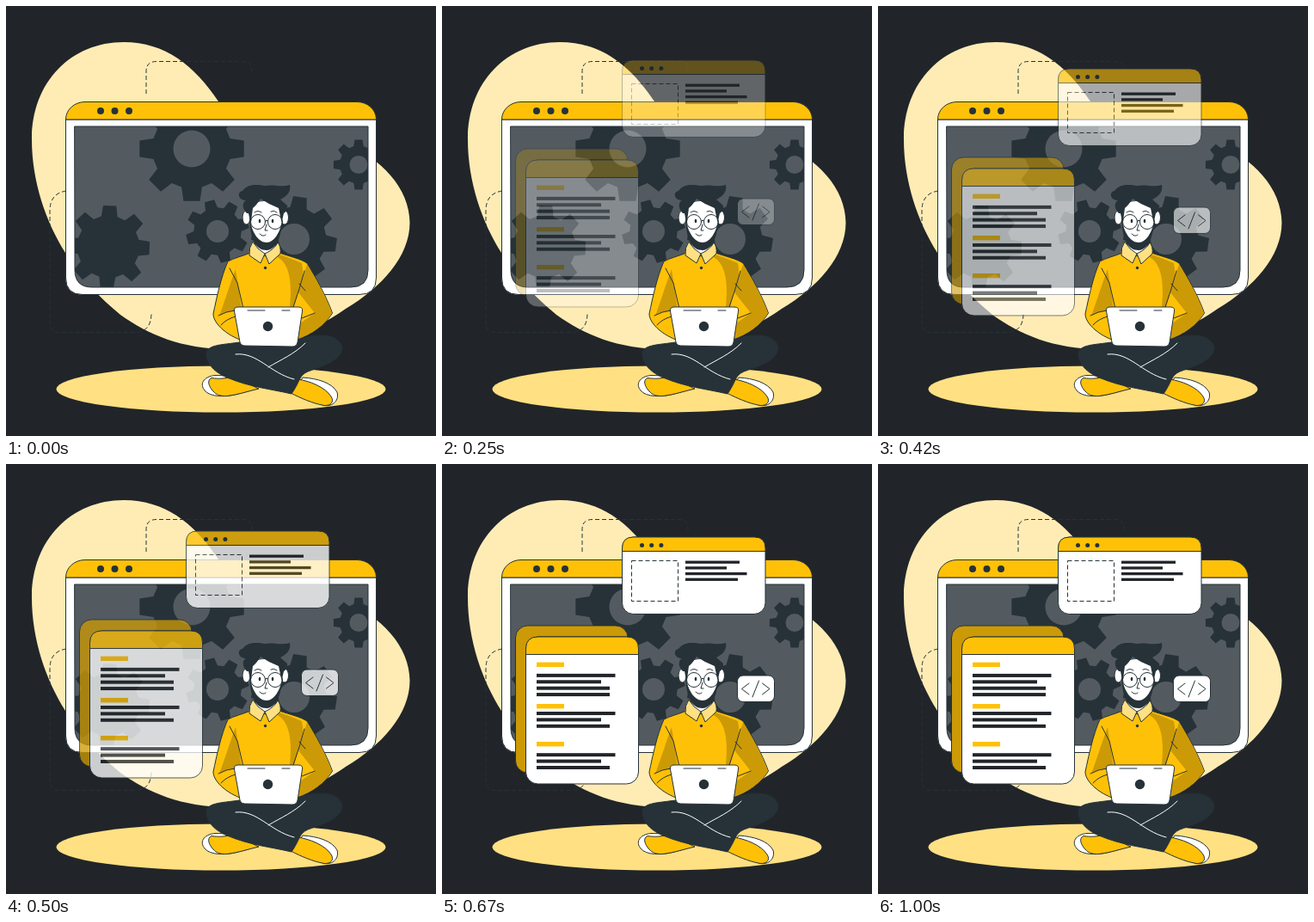
These frames come from a looping animation (500 by 500 pixels, 1040 ms). An HTML page:

```html
<!DOCTYPE html>
<html lang="en">
<head>
<meta charset="utf-8">
<title>Developer at work</title>
<style>
  html, body { margin: 0; width: 100%; height: 100%; overflow: hidden; background: #212529; }
  svg { display: block; width: 100vw; height: 100vh; }
  .gold { fill: #ffc107; }
  .shade { fill: #cc9a06; }
  .soft { fill: #ffe083; }
  .white { fill: #fff; }
  .ink { fill: #263238; }
  .screen { fill: #535b61; }
  .edge { stroke: #263238; stroke-width: 1; stroke-linejoin: round; }
  .line { fill: none; stroke: #263238; stroke-width: 1; stroke-linecap: round; stroke-linejoin: round; }
  .dash { fill: none; stroke: #263238; stroke-width: 1; stroke-dasharray: 5 3; }
</style>
</head>
<body>
<svg viewBox="0 0 500 500">
  <defs>
    <path id="view" d="M80 140H421V307Q421 327 401 327H100Q80 327 80 307Z"/>
    <clipPath id="viewClip"><use href="#view"/></clipPath>
  </defs>

  <rect width="500" height="500" fill="#212529"/>
  <path fill="#ffecb5" d="M137 42C185 42 219 69 247 111C285 163 340 134 390 157C438 178 469 212 469.500 252C469.500 291 437 327 395 352C350 383 304 399 258 399C205 399 165 382 133 359C110 340 85 315 69 287C47 252 30 205 30 155C30 88 76 42 137 42Z"/>
  <path class="dash" d="M163 102V76Q163 64.500 175 64.500H276Q286 64.500 286 74V78"/>
  <path class="dash" d="M70 215Q51 218 51 238V368Q51 379.500 62 379.500H150Q169 379 169 357"/>
  <ellipse class="soft" cx="250" cy="445.500" rx="191.500" ry="27"/>

  <g id="browser">
    <path class="white edge" d="M69.500 132V316Q69.500 335.500 89 335.500H411Q430.500 335.500 430.500 316V132Z"/>
    <path class="gold edge" d="M69.500 132C69.500 120 80 111.500 92 111.500H408C420 111.500 430.500 120 430.500 132Z"/>
    <use href="#view" class="screen"/>
    <g id="gears" clip-path="url(#viewClip)"></g>
    <use href="#view" class="line"/>
  </g>

  <g id="cards">
    <g id="documents">
      <rect class="shade edge" x="85.500" y="188" width="130.500" height="171" rx="14"/>
    </g>
    <g id="popup"></g>
    <rect class="white edge" x="343.500" y="246" width="43" height="30.500" rx="6.500"/>
    <path class="line" d="M357 255L348.500 261.500L357 268M368.500 252L361 271M372.500 255L381 261.500L372.500 268"/>
  </g>

  <g id="developer">
    <!-- legs and shoes -->
    <path class="white edge" d="M243 429.500C229 431 225 440 231 447C237 455 256 455 270 451L292 445L262 430Z"/>
    <path class="gold edge" d="M239 432.500C233 435 236 443 241 448C244 452 250 454 257 453.500C270 452 281 448 294 445L264 431C256 433 248 434 239 432.500Z"/>
    <path class="white edge" d="M345 432C362 433 379 438 385 449C388 460 378 467 368 464L340 440Z"/>
    <path class="gold edge" d="M339 434C353 436 371 443 378 454C382 460 378 465 370 464.500C356 462 343 456 331 450Z"/>
    <path class="ink edge" d="M338 388C360 381 386 380 390.500 396C392 410 374 417 351 425C340 430 342 437 332 451C306 445 283 443 257 432C240 425 233 414 233 404C234 394 250 394 272 391Z"/>
    <path class="line" style="stroke:#fff" d="M267 405C292 402 307 427 335 434M348 392C335 405 320 411 305 420"/>

    <!-- shirt -->
    <path class="gold edge" d="M284 287C275 291 265 293 258 297C250 315 245 339 241 358C241 368 254 381 272 388L338 388C356 382 371 371 379.500 357C372 336 360 316 350 299C343 294 329 291 318 287Z"/>
    <path class="shade" d="M267 306C261 321 255 342 248 360C255 355 265 355 274 353Z"/>
    <path class="shade" d="M313 291C330 297 333 322 330 350H335L342 325Q347 312 344 299Q330 293 318 289Z"/>
    <path class="shade" d="M350 300C360 317 372 337 379 357C371 370 356 382 339 387L342 369L359 357L340 333Z"/>
    <path class="line" d="M260 305L269 322L276 352M247 360Q256 355 266 354M267 361Q256 364 250 371M347 308L341 329L334 350M341 323L348 331M344 363L359 357"/>

    <!-- head -->
    <path class="white edge" d="M290 269V283L301 291L313 282V267Z"/>
    <path class="ink" d="M283 246C284 271 290 284 303 284C315 283 320 268 322 246Z"/>
    <ellipse class="white edge" cx="279.500" cy="246" rx="4.500" ry="8"/>
    <ellipse class="white edge" cx="324" cy="246" rx="4.500" ry="8"/>
    <path class="white" d="M284 232Q300 222 320 232L321 249C319 264 311 275 303 275C294 275 286 264 284 249Z"/>
    <path class="ink" d="M280 241C274 235 275 228 279 226C270 226 268 216 275 215C280 207 292 207 301 209C311 207 321 211 330 208C332 217 325 222 319 225L327 232Q327 239 323 241L320.500 252L317 235Q306 231 296 224Q291 232 287 235L284.500 254L282 241Z"/>
    <g class="line">
      <circle cx="293" cy="251" r="8.500"/>
      <circle cx="313" cy="251" r="8.500"/>
      <path d="M301.500 250Q303 248 304.500 250M303 254L301 261H304M295 265Q299 269 302 266M289 240Q293 237 297 240M308 239Q312 237 315 240"/>
    </g>
    <ellipse class="ink" cx="295" cy="250" rx="1.300" ry="2.200"/>
    <ellipse class="ink" cx="310" cy="250" rx="1.300" ry="2.200"/>
    <path class="soft edge" d="M287 274Q282 281 283 290L296 299L301 288L306 300L319 288Q320 280 316 275Q312 283 301 288Q292 283 287 274Z"/>
    <circle class="ink" cx="301.500" cy="304.500" r="1.700"/>

    <!-- laptop -->
    <path class="white edge" d="M270 350H340Q345.500 350 344.500 355L339 391Q338 396 333 396L277 395Q273 395 272 391L265.500 355Q264.500 350 270 350Z"/>
    <path class="line" d="M281 354H301M321 354H330"/>
    <circle class="ink" cx="304.500" cy="372.500" r="5.700"/>
  </g>
</svg>

<script>
const LOOP = 1040;
const STEP = LOOP / 25;
const DROP_END = 583;
const FADE_END = 600;
const $ = id => document.getElementById(id);

function add(parent, tag, attrs) {
  const node = document.createElementNS('http://www.w3.org/2000/svg', tag);
  for (const key in attrs) node.setAttribute(key, attrs[key]);
  return parent.appendChild(node);
}

function gear(x, y, radius, hole, turn) {
  const corners = [];
  for (let tooth = 0; tooth < 8; tooth++) {
    for (const [offset, reach] of [[-15, .75], [-9, 1], [9, 1], [15, .75]]) {
      const angle = (tooth * 45 + turn + offset) * Math.PI / 180;
      const r = radius * reach;
      corners.push(`${(x + r * Math.cos(angle)).toFixed(1)},${(y + r * Math.sin(angle)).toFixed(1)}`);
    }
  }
  add($('gears'), 'polygon', { class: 'ink', points: corners.join(' ') });
  add($('gears'), 'circle', { class: 'screen', cx: x, cy: y, r: hole });
}

function card(parent, x, y, w, h, r, header) {
  add(parent, 'rect', { class: 'white edge', x, y, width: w, height: h, rx: r });
  add(parent, 'path', {
    class: 'gold edge',
    d: `M${x} ${y + header}V${y + r}q0 ${-r} ${r} ${-r}h${w - 2 * r}q${r} 0 ${r} ${r}V${y + header}Z`
  });
}

function bar(parent, x, y, width, height, fill = '#212529') {
  add(parent, 'rect', { x, y: y - height / 2, width, height, fill });
}

function dots(parent, x, y, gap, r) {
  for (let i = 0; i < 3; i++) add(parent, 'circle', { class: 'ink', cx: x + i * gap, cy: y, r });
}

gear(216, 166, 61.5, 21.5, 0);
gear(246, 262, 37, 13, 30);
gear(335, 271, 50, 18, 8);
gear(410, 184.5, 29.5, 10.5, 0);
gear(119, 280, 48.5, 0, 2);
dots($('browser'), 110, 122, 16.5, 4);

const documents = $('documents');
card(documents, 97.5, 201, 131, 171, 14, 20.5);
for (const [title, first, rows] of [[233.3, 245.9, 4], [281.7, 290, 3], [325.7, 338.2, 3]]) {
  bar(documents, 110, title, 32, 5.4, '#ffc107');
  for (let i = 0; i < rows; i++) {
    bar(documents, 110, first + i * 7.4, [91.5, 75, 85, 85][i], 4);
  }
}

const popup = $('popup');
card(popup, 209.5, 85, 166.5, 89.5, 13, 16.5);
dots(popup, 232.5, 94.5, 11.2, 2.5);
add(popup, 'rect', { class: 'dash', x: 220.5, y: 112.5, width: 54, height: 47 });
[63, 48, 71.5, 61].forEach((width, i) => bar(popup, 283, 114.2 + i * 6.7, width, 3.3));

// The cards drop in at constant speed, then bob once around their resting place.
function cardOffset(t) {
  if (t < DROP_END) return -37 + 35 * t / DROP_END;
  return -2 + 4 * Math.sin(Math.PI * (t - DROP_END) / 500);
}

function cardOpacity(t) {
  return Math.min(1, t / FADE_END) ** 1.4;
}

function draw(now) {
  const t = Math.floor((now % LOOP + 4) / STEP) % 25 * STEP;
  $('cards').setAttribute('transform', `translate(0 ${cardOffset(t).toFixed(2)})`);
  $('cards').setAttribute('opacity', cardOpacity(t).toFixed(3));
}

const start = performance.now();
function tick() {
  draw(performance.now() - start);
  requestAnimationFrame(tick);
}
tick();
</script>
</body>
</html>
```
